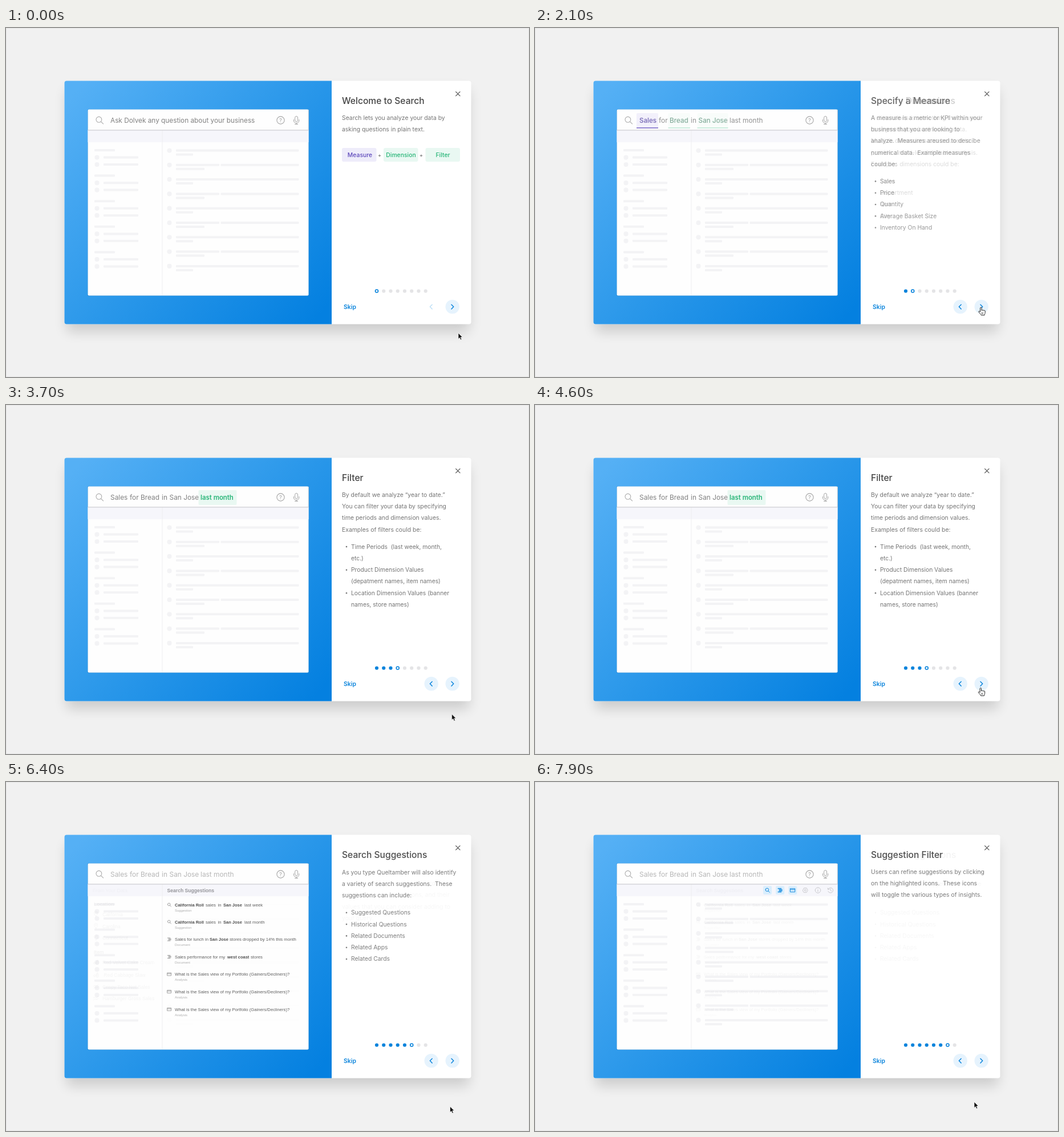
Recreate the animation shown at these times as an HTML page. Size 917 by 611 pixels, loop 8000 ms.

```html
<!DOCTYPE html>
<html lang="en">
<head>
<meta charset="utf-8">
<title>Search tour</title>
<style>
html, body { margin: 0; width: 100%; height: 100%; overflow: hidden; background: #f1f1f1; }
svg { display: block; width: 100%; height: 100%; }
text { white-space: pre; font-family: Inter, "Open Sans", sans-serif; }
.row { font-family: "Liberation Sans", Arial, sans-serif; }
</style>
</head>
<body>
<svg id="stage" viewBox="0 0 917 611">
  <defs>
    <linearGradient id="sky" gradientUnits="userSpaceOnUse" x1="122" y1="110" x2="552" y2="500">
      <stop offset="0" stop-color="#55b0f5"/>
      <stop offset=".5" stop-color="#2b98ea"/>
      <stop offset="1" stop-color="#0480e0"/>
    </linearGradient>
    <filter id="soft" x="-10%" y="-10%" width="120%" height="125%">
      <feGaussianBlur stdDeviation="11"/>
    </filter>
  </defs>
</svg>
<script>
const BLUE = '#0a84dc', GREEN = '#27b577', PURPLE = '#5d48bb';
const MINT = '#e9f8f2', LILAC = '#eeecfa', PALE = '#e6f3fd';
const LOOP = 8000, STEP = 100;

// ---- drawing helpers (all return markup) ----
const rect = (x, y, w, h, fill, r = 0) =>
  `<rect x="${x}" y="${y}" width="${w}" height="${h}" rx="${r}" fill="${fill}"/>`;
const circle = (x, y, r, fill) => `<circle cx="${x}" cy="${y}" r="${r}" fill="${fill}"/>`;
const line = (d, color, w = 1) =>
  `<path d="${d}" fill="none" stroke="${color}" stroke-width="${w}" stroke-linecap="round" stroke-linejoin="round"/>`;
const at = (x, y, body) => `<g transform="translate(${x} ${y})">${body}</g>`;
const group = (id, body) => `<g id="${id}">${body}</g>`;
const range = (n, f) => Array.from({ length: n }, (_, i) => f(i)).join('');

// y is the middle of the line of text
const text = (x, y, str, size, fill, weight = 400, extra = '') =>
  `<text x="${x}" y="${y + size * 0.36}" font-size="${size}" fill="${fill}" font-weight="${weight}" ${extra}>${str}</text>`;
const row = (x, y, str, size, fill = '#555', weight = 400) =>
  text(x, y, str, size, fill, weight, 'class="row"');

const ring = 'a4.8 4.8 0 1 0 9.6 0a4.8 4.8 0 1 0-9.6 0';
const icons = {
  search: c => line('M-3.5-.8a2.8 2.8 0 1 0 5.6 0a2.8 2.8 0 1 0-5.6 0M1.4 1.3L3.8 3.8', c),
  doc: c => line('M-3.5-3H2M-1.5-1H3.5M-1.5 1H3.5M-3.5 3H2', c, 1.3),
  card: c => line('M-4-3H4V3H-4ZM-4-1H4', c),
  gear: c => line('M-4.4 0L-2.2-3.9H2.2L4.4 0 2.2 3.9H-2.2ZM-1.6 0a1.6 1.6 0 1 0 3.2 0a1.6 1.6 0 1 0-3.2 0', c),
  info: c => line('M-4.8 0' + ring + 'M0-2.4V-2.3M0-.4V2.4', c),
  clock: c => line('M-4.2-1.6A4.5 4.5 0 1 1-4.2 1.8M-4.8-3.8L-4.4-1.4-2-1.8M0-2.4V.3L1.8 1.3', c),
  pin: c => line('M0 4.5C-1.6 2-3-.1-3-1.6A3 3 0 0 1 3-1.6C3-.1 1.6 2 0 4.5ZM-.7-1.5a.7.7 0 1 0 1.4 0a.7.7 0 1 0-1.4 0', c, .9),
  item: c => line('M-4 1.7a1.7 1.7 0 1 0 3.4 0a1.7 1.7 0 1 0-3.4 0M.8 3.6V-1H4V3.6ZM1.4-1V-3.4H3.4V-1M.8 1.2H4', c, .9),
  trend: c => line('M-4-.6L-1.5-2 .8-.8 4-3M-4 3L-1.5 1.2 .8 2.4 4 .6', c, .9)
};

// ---- page content ----
const pages = [
  { title: 'Welcome to Search',
    body: ['Search lets you analyze your data by', 'asking questions in plain text.'] },
  { title: 'Specify a Measure',
    body: ['A measure is a metric or KPI within your', 'business that you are looking to',
      'analyze.  Measures areused to descibe', 'numerical data.  Example measures', 'could be:'],
    list: ['Sales', 'Price', 'Quantity', 'Average Basket Size', 'Inventory On Hand'] },
  { title: 'Specify Dimensions',
    body: ['A dimensions is something that is used', 'to segment your businesses’ data.',
      'Multiple dimensions can be used to', 'provide a multi-level drillable analysis.',
      'Examples dimensions could be:'],
    list: ['Store', 'Department', 'Item', 'City'] },
  { title: 'Filter',
    body: ['By default we analyze “year to date.”', 'You can filter your data by specifying',
      'time periods and dimension values.', 'Examples of filters could be:'],
    list: ['Time Periods  (last week, month,', '>etc.)', 'Product Dimension Values',
      '>(depatment names, item names)', 'Location Dimension Values (banner', '>names, store names)'] },
  { title: 'From Your Data',
    body: ['As you type Queltamber will identify', 'matches within your data and provide a',
      'list of measures, dimensions, and their', 'values that you can consider adding to', 'your query.'] },
  { title: 'Search Suggestions', top: 158,
    body: ['As you type Queltamber will also identify', 'a variety of search suggestions.  These',
      'suggestions can include:'],
    list: ['Suggested Questions', 'Historical Questions', 'Related Documents', 'Related Apps', 'Related Cards'] },
  { title: 'Suggestion Filter',
    body: ['Users can refine suggestions by clicking', 'on the highlighted icons.  These icons',
      'will toggle the various types of insights.'] }
];

function panelText({ title, body, list = [], top = 157 }) {
  const y = i => top + i * 20.3;
  const listTop = y(body.length) + 9.6;
  return text(589, 127, title, 15.6, '#444', 500) +
    body.map((s, i) => text(589, y(i), s, 10.4, '#757575')).join('') +
    list.map((s, i) => {
      const ly = listTop + i * 20.3;
      const more = s[0] === '>';
      return (more ? '' : circle(597, ly + .3, 1.3, '#757575')) +
        text(605, ly, more ? s.slice(1) : s, 10.3, '#757575');
    }).join('');
}

// ---- search bar ----
const words = [['Sales', 183], ['for', 217], ['Bread', 236], ['in', 273], ['San Jose', 286.5], ['last month', 341]];
const marks = {
  1: { hits: { 0: [178, 38] }, fill: LILAC, color: PURPLE, under: true },
  2: { hits: { 2: [233.5, 38.5], 4: [284.5, 54] }, fill: MINT, color: GREEN, under: true },
  3: { hits: { 5: [337.5, 67] }, fill: MINT, color: GREEN }
};

function query(page) {
  if (page === 0) return text(183, 161.7, 'Ask Dolvek any question about your business', 11.8, '#828282');
  const mark = marks[page] || { hits: {} };
  const base = page > 3 ? '#b4b4b4' : '#828282';
  return words.map(([word, x], i) => {
    const hit = mark.hits[i];
    if (!hit) return text(x, 161.7, word, 11.9, base);
    return rect(hit[0], 149, hit[1], 26, mark.fill, 2) +
      (mark.under ? rect(hit[0], 174, hit[1], 1.7, mark.color) : '') +
      text(x, 161.7, word, 11.4, mark.color, 600);
  }).join('');
}

// ---- extras of single pages ----
function chips() {
  const chip = (x, w, mid, s, fill, color) => rect(x, 210, w, 24, fill, 3) +
    text(mid, 222.3, s, 10.4, color, 500, 'text-anchor="middle"');
  return chip(589, 60.5, 620.5, 'Measure', LILAC, PURPLE) +
    chip(662, 60.5, 692.5, 'Dimension', MINT, GREEN) +
    chip(735.5, 60.5, 766, 'Filter', MINT, GREEN) +
    [655, 728].map(x => text(x, 222.3, '+', 9, '#666', 500, 'text-anchor="middle"')).join('');
}

function dataList() {
  const items = [
    ['pin', 231.5, 'California'], ['pin', 252.5, 'Carolina'], ['pin', 273, 'Connecticut'],
    ['item', 316, 'Red Velvet Cake Cream'], ['item', 338, ' Red Cabbage Slaw'],
    ['trend', 358.5, 'Crispy Taco Net Sales'], ['trend', 379, 'Hamburger Gross Sales']
  ];
  return row(152, 189.7, 'From Your Data', 8.7, '#8f8f94') +
    row(154, 213.5, 'Location', 8.5, '#444', 700) + row(154, 297.5, 'Item', 8.5, '#444', 700) +
    items.map(([icon, y, s]) => at(157.7, y - .5, icons[icon]('#666')) + row(169, y, s, 8.5)).join('');
}

function suggestions() {
  const view = [[296, 'What is the Sales view of my Portfolio (Gainers/Decliners)?']];
  const roll = when => [[296, '*California Roll'], [350, 'sales'], [371.5, 'in'], [381, '*San Jose'], [418, when]];
  const rows = [
    ['search', 'Suggestion', 215, roll('last week')],
    ['search', 'Suggestion', 245, roll('last month')],
    ['doc', 'Document', 275.5, [[296, 'Sales for lunch in'], [357, '*San Jose'], [392, 'stores dropped by 14% this month']]],
    ['doc', 'Document', 306, [[296, 'Sales performance for my'], [388, '*west coast'], [429, 'stores']]],
    ['card', 'Analysis', 336.5, view], ['card', 'Analysis', 367, view], ['card', 'Analysis', 398, view]
  ];
  return row(282.5, 190, 'Search Suggestions', 8.6, '#8f8f94', 700) +
    rows.map(([icon, kind, y, parts]) =>
      `<g transform="translate(286.3 ${y}) scale(.82)">${icons[icon]('#888')}</g>` +
      parts.map(([x, s]) => s[0] === '*'
        ? row(x, y, s.slice(1), 7.5, '#444', 700) : row(x, y, s, 7.7)).join('') +
      row(296, y + 9.5, kind, 5.9, '#aaa')).join('');
}

const filterBar = () => ['search', 'doc', 'card', 'gear', 'info', 'clock'].map((name, i) =>
  at(407.6 + i * 22.1, 189.5, i < 3
    ? rect(-7.5, -7.5, 15, 15, '#d8eefd', 2) + icons[name](BLUE)
    : icons[name]('#c6c6ca'))).join('');

const extras = { 0: chips, 4: dataList, 5: suggestions, 6: filterBar };

// ---- fixed parts ----
const BONE = '#f3f3f5';
const bar = (x, y, w) => rect(x, y - 2, w, 4, BONE, 1);

const leftBones = range(5, g => {
  const y = 214 + g * 44.6;
  return bar(155, y, 36) + [12.6, 25].map(d => circle(159.5, y + d, 4.1, BONE) + bar(171, y + d, 61)).join('');
});
const rightBones = range(9, i => {
  const y = 214.5 + i * 25.3;
  return circle(286.5, y, 4.1, BONE) +
    (i % 2 ? bar(298, y, 76) + bar(376.5, y, 137) + bar(298, y + 7, 50)
      : bar(298, y, 215.5) + bar(298, y + 7, 30));
});

const backdrop =
  rect(0, 0, 917, 611, '#f1f1f1') +
  '<rect x=".5" y=".5" width="916" height="610" fill="none" stroke="#e6e6e6"/>' +
  `<g filter="url(#soft)" opacity=".15">${rect(106, 108, 706, 424, '#000', 6)}</g>` +
  rect(102.5, 92.5, 713, 426, '#fff', 4) +
  '<path d="M571 92.5H106.5a4 4 0 0 0-4 4V514.5a4 4 0 0 0 4 4H571Z" fill="url(#sky)"/>' +
  rect(143, 142.5, 388, 326.5, '#2587d2', 2) +
  rect(143.5, 142.5, 387, 326, '#fefefe', 2) +
  rect(143.5, 179, 387, 21, '#f6f6fb') +
  rect(273.5, 179, 1, 289, '#ededf0') +
  rect(143.5, 178.3, 387, 1.1, '#c8c8cc') +
  rect(529.8, 143, .9, 36, '#cfcfd3');

const barIcons =
  line('M158 160.3a4.9 4.9 0 1 0 9.8 0a4.9 4.9 0 1 0-9.8 0M166.4 163.9L170.6 167.8', '#ababab', 1.1) +
  line('M474.9 161.5a6.6 6.6 0 1 0 13.2 0a6.6 6.6 0 1 0-13.2 0', '#a5a5a5', 1.1) +
  text(481.5, 161.6, '?', 9.5, '#a0a0a0', 400, 'text-anchor="middle"') +
  line('M506.6 157a2.5 2.5 0 0 1 5 0V161.5a2.5 2.5 0 0 1-5 0ZM504.4 160.5V162a4.7 4.7 0 0 0 9.4 0V160.5M509.1 166.8V168.6M506.6 168.6H511.6', '#a5a5a5', 1);

const controls =
  line('M788.7 111.6L796 118.9M796 111.6L788.7 118.9', '#555', 1.3) +
  text(592, 488.3, 'Skip', 10.4, BLUE, 600) +
  circle(782.7, 488, 12.2, PALE) + line('M781 484.3L784.8 488 781 491.9', BLUE, 1.5) +
  group('back', circle(745.7, 488, 12.2, PALE)) +
  `<g id="chevron">${line('M747.2 484.3L743.4 488 747.2 491.9', 'currentColor', 1.5)}</g>` +
  range(8, i => `<circle class="dot" cx="${650 + i * 12.25}" cy="460.5"/>`);

const pointer =
  group('arrow', '<path d="M0 0V10.4L2.4 8.2 4 12 5.9 11.2 4.3 7.5H7.5Z" fill="#111" stroke="#fff" stroke-width=".7"/>') +
  group('hand', '<path d="M-1.3 8V1.2a1.2 1.2 0 0 1 2.4 0V5.4a1.1 1.1 0 0 1 2.1.2 1.1 1.1 0 0 1 2.1.4 1 1 0 0 1 1.9.6V9.5c0 1.6-1 2.3-1 4.2H.2C-.3 12-2 10.8-3.9 8.2c-.8-1.1.5-1.9 1.4-1.1Z" fill="#fff" stroke="#222" stroke-linejoin="round"/>' +
    line('M1.4 9V11.6M3.3 9V11.6', '#222', .7));

const stage = document.getElementById('stage');
stage.insertAdjacentHTML('beforeend',
  backdrop + group('leftBones', leftBones) + group('rightBones', rightBones) +
  pages.map((p, i) => group('page' + i, query(i) + panelText(p) + (extras[i] ? extras[i]() : ''))).join('') +
  barIcons + controls + group('cursor', pointer));

// ---- motion ----
const $ = id => document.getElementById(id);
const dots = [...document.querySelectorAll('.dot')];

// start and length of the fade into pages 1 to 6
const fades = [[600, 280], [2000, 300], [3400, 300], [4900, 300], [6100, 350], [7600, 350]];

// time, x, y of the pointer tip; a fourth value 1 makes the way there linear
const path = [
  [0, 793, 534], [500, 780, 489], [900, 780, 489], [1200, 783, 543], [1900, 782, 489],
  [2100, 782, 489], [2450, 781, 572], [3100, 783, 487], [3500, 783, 487], [3850, 781, 566],
  [4900, 781.5, 488], [4950, 781.5, 488], [5200, 778.5, 577], [5400, 778.5, 577],
  [5500, 778.5, 542, 1], [5800, 781, 490, 1], [6100, 781, 493], [6400, 778.5, 568],
  [6900, 778.5, 568], [7400, 781, 495], [7650, 781, 495], [7900, 770, 560]
];

const clamp = v => Math.min(1, Math.max(0, v));
const smooth = p => p * p * (3 - 2 * p);
const ease = p => p < .5 ? 4 * p ** 3 : 1 - 4 * (1 - p) ** 3;

function pointerAt(t) {
  const i = path.findIndex(k => k[0] > t);
  if (i < 0) return path[path.length - 1].slice(1, 3);
  const a = path[i - 1], b = path[i];
  const raw = (t - a[0]) / (b[0] - a[0]);
  const p = b[3] ? raw : ease(raw);
  return [a[1] + (b[1] - a[1]) * p, a[2] + (b[2] - a[2]) * p];
}

function draw(t) {
  const shown = [1, ...fades.map(([start, len]) => smooth(clamp((t - start) / len)))];
  const alpha = shown.map((p, i) => p * (1 - (shown[i + 1] || 0)));
  alpha.forEach((a, i) => {
    $('page' + i).setAttribute('opacity', a);
    $('page' + i).setAttribute('display', a ? 'inline' : 'none');
  });
  $('leftBones').setAttribute('opacity', 1 - alpha[4]);
  $('rightBones').setAttribute('opacity', 1 - alpha[5]);

  const current = shown.filter(p => p > .5).length - 1;
  dots.forEach((dot, i) => {
    const now = i === current;
    dot.setAttribute('r', now ? 2.5 : 3.1);
    dot.setAttribute('fill', now ? '#fff' : i < current ? BLUE : '#e4e4e6');
    dot.setAttribute('stroke', now ? BLUE : 'none');
    dot.setAttribute('stroke-width', 1.6);
  });
  $('back').setAttribute('opacity', shown[1]);
  $('chevron').setAttribute('color', current ? BLUE : '#bfe0f6');

  const [x, y] = pointerAt(t);
  const over = Math.hypot(x - 782.7, y - 488) < 12.2;
  $('cursor').setAttribute('transform', `translate(${x} ${y})`);
  $('hand').setAttribute('display', over ? 'inline' : 'none');
  $('arrow').setAttribute('display', over ? 'none' : 'inline');
}

// the picture advances ten times a second
const begin = performance.now();
function tick() {
  const t = (performance.now() - begin) % LOOP;
  draw(Math.floor(t / STEP) * STEP);
  requestAnimationFrame(tick);
}
tick();
</script>
</body>
</html>
```
